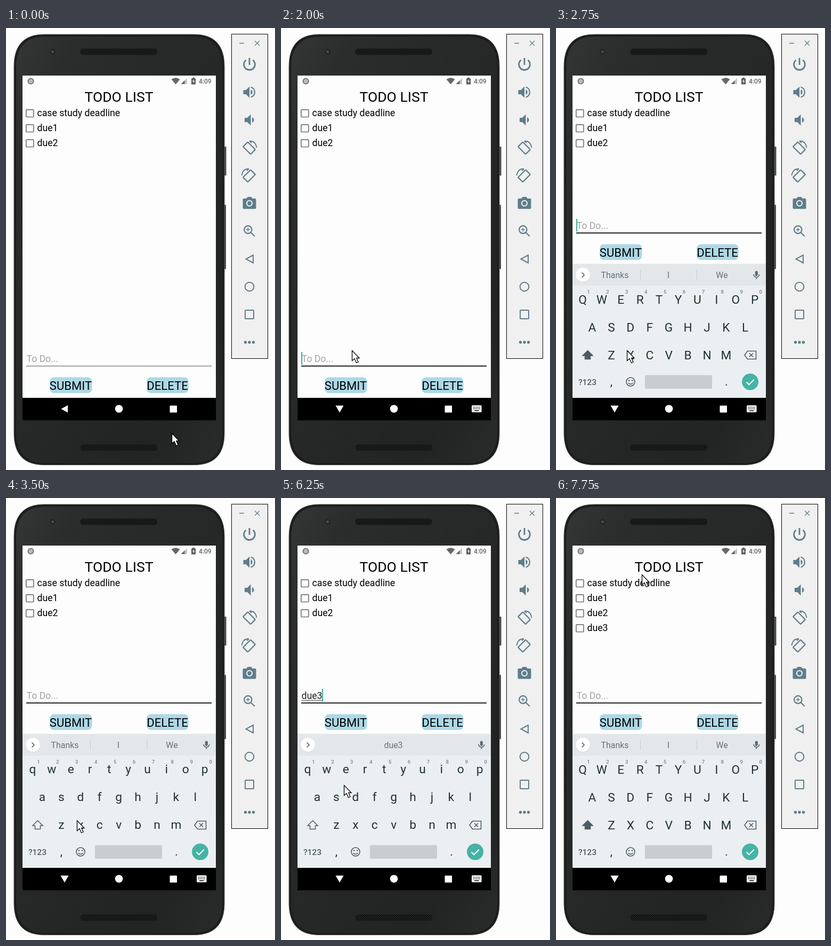
These frames come from a looping animation (505x827 px, 8 s). An HTML page:

```html
<!DOCTYPE html>
<html lang="en">
<head>
<meta charset="utf-8">
<title>Todo list</title>
<style>
  html, body { margin: 0; width: 100%; height: 100%; overflow: hidden; background: #fdfdfd; }
  svg { display: block; width: 505px; height: 827px; font-family: Roboto, sans-serif; }
  .mid { text-anchor: middle; }
  .line { fill: none; stroke: #5f7d8b; stroke-width: 2.3; }
  .solid { fill: #5f7d8b; }
  .keyline { fill: none; stroke: #4d5c64; stroke-width: 1.6; }
</style>
</head>
<body>
<svg viewBox="0 0 505 827">
  <defs>
    <linearGradient id="shell" x2="1" y2="1">
      <stop stop-color="#343535"/><stop offset=".15" stop-color="#2b2c2c"/>
      <stop offset=".8" stop-color="#222323"/><stop offset="1" stop-color="#292a2a"/>
    </linearGradient>
    <pattern id="mesh" width="4" height="4" patternUnits="userSpaceOnUse">
      <rect width="4" height="4" fill="#111"/><path d="M0 0h2v2h-2zM2 2h2v2h-2z" fill="#202020"/>
    </pattern>
    <clipPath id="screen"><rect x="31" y="89" width="363" height="645"/></clipPath>
  </defs>

  <!-- Phone -->
  <path d="M409 222h4.500v54h-4.500zM409 331h4v120h-4z" fill="#4a4b4b"/>
  <path d="M15 72C15 32 34 12 72 12H353C391 12 410 32 410 72V758C410 798 391 817.500 353 817.500H72C34 817.500 15 798 15 758Z" fill="#1b1c1c" stroke="#555" stroke-width="1"/>
  <path d="M19 73C19 36 37 16 73 16H352C388 16 406 36 406 73V757C406 794 388 814 352 814H73C37 814 19 794 19 757Z" fill="url(#shell)"/>
  <circle cx="87.500" cy="44.500" r="5" fill="#202324"/><circle cx="87.500" cy="44.500" r="2.500" fill="#48504f"/>
  <rect x="139.500" y="38.500" width="144.500" height="12" rx="5" fill="url(#mesh)"/>
  <rect x="139.500" y="779" width="144.500" height="12" rx="5" fill="url(#mesh)"/>

  <g clip-path="url(#screen)">
    <rect x="31" y="89" width="363" height="645" fill="#fdfdfd"/>
    <!-- Status bar -->
    <circle cx="46.500" cy="99.500" r="5" fill="#bbb" stroke="#777" stroke-width="2.200"/>
    <path d="M310.500 96Q318.500 90.500 326.500 96L318.500 105.500Z" fill="#666"/>
    <path d="M328.500 105H340V93.500Z" fill="#c5c5c5"/><path d="M328.500 105H335.500V98Z" fill="#666"/>
    <path d="M348 94.500h2v-1.500h4v1.500h2v11h-8z" fill="#5c5c5c"/><path d="M352.500 96l-2.500 4h1.700v3.500l2.700-4.300h-1.900z" fill="#fff"/>
    <text x="362" y="104" font-size="12" font-weight="500" fill="#666">4:09</text>

    <text class="mid" x="212" y="138" font-size="26.500">TODO LIST</text>
    <g id="list"></g>

    <g id="form">
      <text id="entry" x="38.500" y="625" font-size="17.660"></text>
      <path id="composing" stroke="#444"/>
      <path id="caret" stroke="#1a9c8c" stroke-width="1.700"/>
      <path id="rule"/>
      <g fill="#add8e6">
        <rect x="82" y="653.500" width="79.500" height="29.500" rx="8"/>
        <rect x="264" y="653.500" width="78.500" height="29.500" rx="8"/>
      </g>
      <g class="mid" font-size="22.070">
        <text x="121.500" y="676.500">SUBMIT</text><text x="303" y="676.500">DELETE</text>
      </g>
    </g>

    <!-- Navigation bar -->
    <rect x="31" y="692" width="363" height="42"/>
    <g fill="#fff">
      <path id="back"/>
      <circle cx="212" cy="712.500" r="7.300"/>
      <rect x="307.500" y="706.500" width="13.500" height="13" rx="1"/>
      <g id="imeSwitch">
        <rect x="358" y="706" width="18.500" height="13" rx="1.500"/>
        <path d="M360.500 709.500H374M360.500 712.500H374" stroke="#000" stroke-width="1.600" stroke-dasharray="1.600 1.300"/>
        <path d="M363 716H371.500" stroke="#000" stroke-width="1.500"/>
      </g>
    </g>

    <g id="keyboard">
      <rect x="31" y="441" width="363" height="251" fill="#eceff1"/>
      <rect x="31" y="441.500" width="363" height="40.500" fill="#e3e7ea"/>
      <circle cx="50.500" cy="462.500" r="13.500" fill="#d2d6d8"/><circle cx="50.500" cy="461.700" r="13.200" fill="#fff"/>
      <path class="keyline" d="M48.500 457.500l4.500 4.500-4.500 4.500"/>
      <g id="suggestions" class="mid" font-size="15.900" fill="#66737a"></g>
      <rect x="373.800" y="454.500" width="5" height="9.500" rx="2.500" fill="#5c686e"/>
      <path class="keyline" d="M371 461a5.300 5.300 0 0 0 10.600 0M376.300 466.300v3.500"/>
      <g id="keys" class="mid" fill="#1f3138"></g>
      <path id="shift" d="M59.500 603.500L69 613h-4.500v6.500h-10V613H50Z" stroke="#4d5c64" stroke-width="1.500"/>
      <path class="keyline" d="M354 612l5.500-7.500h16v15h-16zM363 608.500l7 7m0-7l-7 7"/>
      <text class="mid" x="59" y="668" font-size="15.500" font-weight="500" fill="#4d5c64">?123</text>
      <g class="mid" font-size="22" fill="#263238"><text x="104" y="668.500">,</text><text x="320" y="668.500">.</text></g>
      <circle class="keyline" cx="140" cy="662" r="8"/>
      <path class="keyline" d="M135.800 664a4.500 3.500 0 0 0 8.400 0"/>
      <g fill="#4d5c64"><circle cx="137" cy="659.500" r="1.300"/><circle cx="143" cy="659.500" r="1.300"/></g>
      <rect x="167" y="649.500" width="126" height="25.500" rx="2" fill="#c9cdd0"/>
      <circle cx="364.500" cy="662" r="15.500" fill="#45b3a6"/>
      <path d="M357.500 662.500l4.800 4.800 9.500-9.500" fill="none" stroke="#fff" stroke-width="2"/>
    </g>
  </g>

  <!-- Emulator toolbar -->
  <rect x="423.500" y="11.500" width="68" height="607" fill="#f0f0f0" stroke="#000"/>
  <path class="line" d="M438 28.500h9M467 24l9 9m0-9l-9 9" style="stroke-width:1.300"/>
  <path class="line" d="M457 56v13M450.500 60A10.400 10.400 0 1 0 463.500 60" style="stroke-width:2.800"/>
  <path class="solid" d="M445.500 116v8h5l6.500 6.500v-21L450.500 116zM459.500 115q3.200 1.700 3.200 5t-3.200 5z"/>
  <path class="line" d="M459.500 110.500a9.800 9.800 0 0 1 0 19"/>
  <path class="solid" d="M448 168v8h5l6.500 6.500v-21L453 168zM462 167q3.500 1.700 3.500 5t-3.500 5z"/>
  <g id="rotate">
    <rect class="line" x="446.500" y="218.500" width="20" height="12.500" rx="1" transform="rotate(45 456.500 224.750)"/>
    <path class="line" d="M457 211.500Q468.500 211 470.500 224M457 211.500l4 3.500" style="stroke-width:1.800"/>
  </g>
  <use href="#rotate" transform="matrix(-1 0 0 1 913 52)"/>
  <path class="solid" d="M446.500 319h5l2-3h7l2 3h5q2 0 2 2v15.500q0 2-2 2h-21q-2 0-2-2V321q0-2 2-2z"/>
  <circle cx="457" cy="328" r="5" fill="#5f7d8b" stroke="#f0f0f0" stroke-width="2.200"/>
  <circle class="line" cx="454.300" cy="377.300" r="7.200"/>
  <path class="line" d="M459.500 382.500l7.300 7.300"/>
  <path class="line" d="M450.800 377.300h7M454.300 373.800v7" style="stroke-width:1.600"/>
  <path class="line" d="M464 425v14.500L450.500 432.200z" style="stroke-width:2"/>
  <circle class="line" cx="457" cy="484" r="8.300" style="stroke-width:2"/>
  <rect class="line" x="449" y="528" width="16" height="16" rx="1" style="stroke-width:2"/>
  <g class="solid"><circle cx="449.500" cy="588" r="2.700"/><circle cx="457" cy="588" r="2.700"/><circle cx="464.500" cy="588" r="2.700"/></g>

  <path id="pointer" d="M.5 .5V19.500L5 15.500L8.500 23.500L12 22L8.800 14.500H14Z" fill="#fff" stroke="#000" stroke-width="1.300"/>
</svg>
<script>
const LOOP = 8000;
const el = Object.fromEntries([...document.querySelectorAll('[id]')].map(e => [e.id, e]));
const idleWords = ['Thanks', 'I', 'We'];

// Each step holds only what changes at its time.
const steps = [
  [0, { pointer: [311, 758], text: '', items: 3, focus: false, caret: false, ime: false, board: null, caps: true, words: idleWords }],
  [250, { pointer: [297, 732] }],
  [500, { pointer: [232, 640] }],
  [750, { pointer: [160, 562] }],
  [1000, { pointer: [128, 580] }],
  [1250, { pointer: [133, 603] }],
  [1500, { focus: true, caret: true }],
  [2000, { ime: true }],
  [2250, { board: 4.5, caret: false }],
  [2500, { board: 0 }],
  [2750, { caret: true }],
  [3250, { caret: false }],
  [3500, { caps: false }],
  [3750, { text: 'd', caret: true, words: ['d', 'do', 'did'] }],
  [4000, { text: 'du', words: ['du', 'due', 'dude'] }],
  [4500, { text: 'due', words: ['due', 'due to', 'dude'] }],
  [5000, { caret: false }],
  [5250, { text: 'due3', caret: true, words: ['', 'due3', ''] }],
  [5750, { pointer: [132, 598], caret: false }],
  [6000, { pointer: [128, 575] }],
  [6250, { pointer: [118, 537], caret: true }],
  [6500, { pointer: [108, 470] }],
  [6750, { pointer: [108, 415], caret: false }],
  [7250, { text: '', items: 4, caret: true, caps: true, words: idleWords }],
  [7500, { pointer: [132, 280] }],
  [7750, { pointer: [161, 143], caret: false }],
];

const show = (node, on) => node.setAttribute('visibility', on ? 'visible' : 'hidden');
const label = (x, y, text, extra = '') => `<text x="${x}" y="${y}" ${extra}>${text}</text>`;

function listMarkup(count) {
  return ['case study deadline', 'due1', 'due2', 'due3'].slice(0, count).map((text, i) =>
    `<rect x="37.800" y="${152.8 + 28 * i}" width="14" height="13.700" rx="1" fill="none" stroke="#757575" stroke-width="1.700"/>` +
    label(58.5, 164.5 + 28 * i, text, 'font-size="17.660"')).join('');
}

function keysMarkup(caps) {
  const rows = ['qwertyuiop', 'asdfghjkl', 'zxcvbnm'];
  return rows.map((row, r) => [...row].map((key, i) => {
    const x = [50, 68, 104][r] + 35.9 * i;
    const hint = r ? '' : label(x + 11, 497, (i + 1) % 10, 'font-size="9.500" font-weight="500" fill="#78848a"');
    return label(x, 515 + 52 * r + (caps ? 1 : 0), caps ? key.toUpperCase() : key, 'font-size="22.700"') + hint;
  }).join('')).join('');
}

function suggestionsMarkup(words) {
  const dividers = words[0] ? '<path d="M158.500 452v20M264.500 452v20" stroke="#c6cbce"/>' : '';
  return dividers + words.map((word, i) => label(110.5 + 100.5 * i, 468, word)).join('');
}

function draw(s) {
  el.list.innerHTML = listMarkup(s.items);
  el.form.setAttribute('transform', `translate(0 ${s.board === null ? 0 : -249})`);
  el.entry.textContent = s.text || 'To Do...';
  el.entry.setAttribute('fill', s.text ? '#222' : '#a3a3a3');
  const end = 38.5 + (s.text ? el.entry.getComputedTextLength() : 0);
  el.composing.setAttribute('d', `M38.500 627.500H${end}`);
  show(el.composing, s.text);
  el.caret.setAttribute('d', `M${end + .5} 606V630`);
  show(el.caret, s.caret);
  el.rule.setAttribute('d', `M38 632.500H386`);
  el.rule.setAttribute('stroke', s.focus ? '#1c1c1c' : '#555');
  el.rule.setAttribute('stroke-width', s.focus ? 1.8 : 1);
  el.back.setAttribute('d', s.ime ? 'M102.500 706.500H117.500L110 719.500Z' : 'M103.500 712.700L116 705.800V719.500Z');
  show(el.imeSwitch, s.ime);
  show(el.keyboard, s.board !== null);
  el.keyboard.setAttribute('transform', `translate(0 ${s.board || 0})`);
  el.keyboard.setAttribute('opacity', s.board ? .92 : 1);
  el.suggestions.innerHTML = suggestionsMarkup(s.words);
  el.keys.innerHTML = keysMarkup(s.caps);
  el.shift.setAttribute('fill', s.caps ? '#4d5c64' : 'none');
  el.pointer.setAttribute('transform', `translate(${s.pointer})`);
}

let shown = -1;
function tick(now) {
  const time = now % LOOP;
  const index = steps.filter(([start]) => start <= time).length;
  if (index !== shown) {
    draw(Object.assign({}, ...steps.slice(0, index).map(([, change]) => change)));
    shown = index;
  }
  requestAnimationFrame(tick);
}
const origin = performance.now();
const loop = () => tick(Math.max(0, performance.now() - origin));
tick = (original => function () {
  original(Math.max(0, performance.now() - origin));
})(tick);
loop();
</script>
</body>
</html>
```
